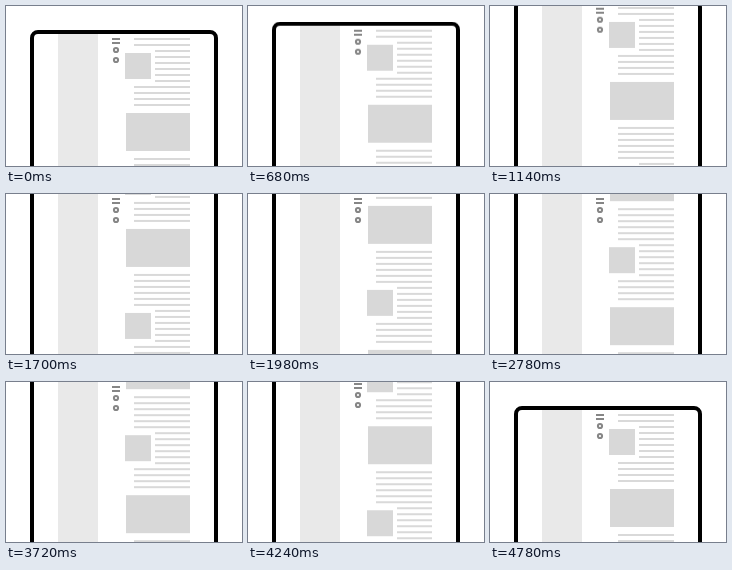
An HTML page for the animation above (4.92 s loop, 236 by 160 pixels).

```html
<!DOCTYPE html>
<html lang="en">
<head>
<meta charset="utf-8">
<title>Sticky menu scroll</title>
<style>
  html, body { margin: 0; width: 100%; height: 100%; overflow: hidden; background: #fff; }
  svg { display: block; width: 236px; height: 160px; }

  .page { animation: scroll 4920ms infinite; }
  .menu { animation: stick 4920ms infinite; }

  @keyframes scroll {
    0%      { transform: translateY(0); }
    8.537%  { transform: translateY(0); animation-timing-function: cubic-bezier(.333, 0, .667, .661); }
    19.106% { transform: translateY(-22px); animation-timing-function: cubic-bezier(.333, .319, .667, .511); }
    23.171% { transform: translateY(-31px); animation-timing-function: cubic-bezier(.333, .3, .667, .654); }
    34.553% { transform: translateY(-72px); animation-timing-function: cubic-bezier(.333, .323, .667, .749); }
    46.748% { transform: translateY(-119px); animation-timing-function: cubic-bezier(.333, .538, .667, 1); }
    57.317% { transform: translateY(-138px); }
    75.203% { transform: translateY(-138px); animation-timing-function: cubic-bezier(.333, 0, .667, .52); }
    86.179% { transform: translateY(-63px); animation-timing-function: cubic-bezier(.333, .571, .667, 1); }
    97.154%, 100% { transform: translateY(0); }
  }

  /* Moves with the page, then stays near the top edge */
  @keyframes stick {
    0%      { transform: translateY(0); }
    8.537%  { transform: translateY(0); animation-timing-function: cubic-bezier(.333, 0, .667, .661); }
    19.106% { transform: translateY(-22px); animation-timing-function: cubic-bezier(.333, .319, .667, .7); }
    23.171% { transform: translateY(-30.3px); animation-timing-function: ease-out; }
    26.423% { transform: translateY(-28px); }
    75.203% { transform: translateY(-28px); animation-timing-function: ease-in-out; }
    86.179% { transform: translateY(-31px); }
    89.797% { transform: translateY(-31px); animation-timing-function: cubic-bezier(.333, .607, .667, 1); }
    97.154%, 100% { transform: translateY(0); }
  }
</style>
</head>
<body>
<svg viewBox="0 0 236 160">
  <defs>
    <clipPath id="inside"><rect x="28" y="28" width="180" height="420"/></clipPath>
    <g id="block">
      <path stroke="#d9d9d9" stroke-width="2" d="M128 9h56m-56 6h56m-56 6h56m-56 6h56m-56 6h56m-56 6h56
        M149 45h35m-35 6h35m-35 6h35m-35 6h35m-35 6h35m-35 6h35
        M128 81h56m-56 6h56m-56 6h56m-56 6h56"/>
      <path fill="#d8d8d8" d="M119 47h26v26h-26zM120 107h64v38h-64z"/>
    </g>
  </defs>

  <g class="page">
    <g clip-path="url(#inside)">
      <rect x="52" y="28" width="40" height="420" fill="#e9e9e9"/>
      <use href="#block"/>
      <use href="#block" y="144"/>
      <use href="#block" y="288"/>
    </g>
    <rect x="26" y="26" width="184" height="440" rx="6" fill="none" stroke="#000" stroke-width="4"/>
  </g>

  <g class="menu" fill="none" stroke="#868686" stroke-width="2">
    <path d="M106 33h8m-8 4h8"/>
    <circle cx="110" cy="44" r="2.1"/>
    <circle cx="110" cy="54" r="2.1"/>
  </g>
</svg>
</body>
</html>
```
